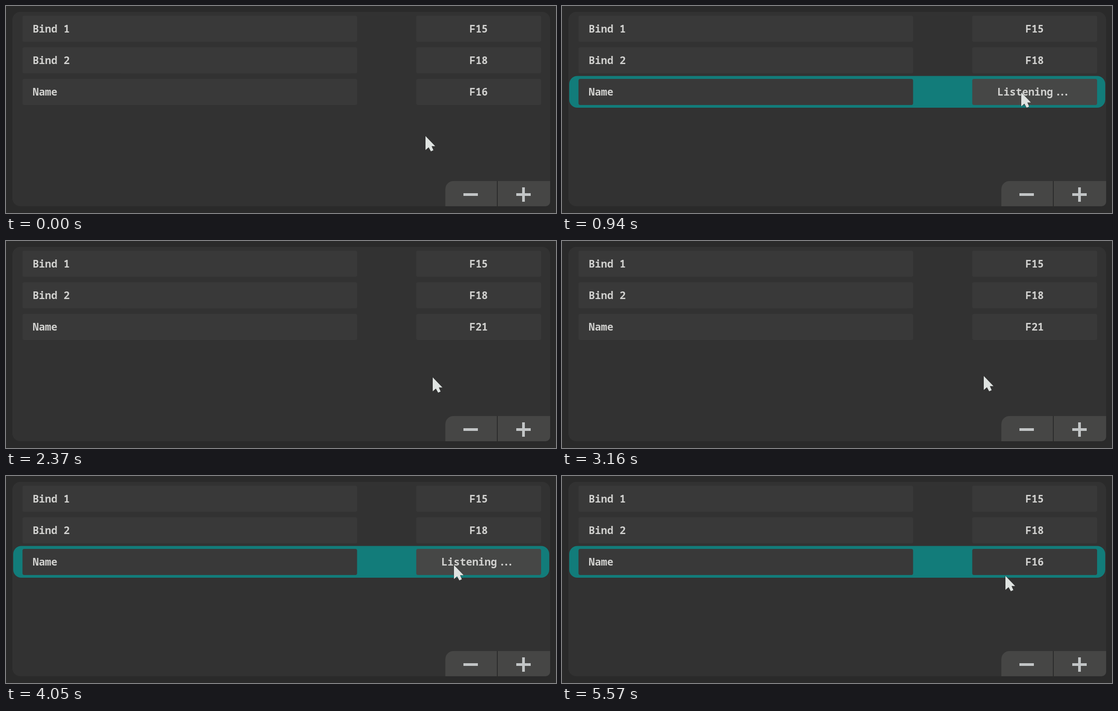
Recreate the animation shown at these times as an HTML page. Size 1218x460 px, loop 5600 ms.

```html
<!DOCTYPE html>
<html lang="en">
<head>
<meta charset="utf-8">
<title>Key binds</title>
<style>
  html, body { margin: 0; width: 100%; height: 100%; overflow: hidden; background: #2a2a2a; }
  svg { display: block; width: 1218px; height: 460px; }
  text { font: 600 22.8px "Noto Sans Mono", "DejaVu Sans Mono", monospace; fill: #d0d0ce; white-space: pre; }
  .key { text-anchor: middle; }
  .field { fill: #393939; }
</style>
</head>
<body>
<svg viewBox="0 0 1218 460">
  <rect x="14" y="13" width="1191" height="432" rx="18" fill="#323232"/>
  <rect id="glow" x="16" y="155.5" width="1187" height="70.5" rx="18" fill="#127c7a"/>
  <g id="rows"></g>
  <g id="listening">
    <text x="964" y="199">Listening</text>
    <text x="1092" y="199" letter-spacing="-4.7">...</text>
  </g>
  <path d="M973 445V407a18 18 0 0 1 18-18h96v56zM1089 389h116v46a10 10 0 0 1-10 10h-106z" fill="#464645"/>
  <path d="M1087 389h2v56h-2z" fill="#2b2b2b"/>
  <path d="M1013 419h32M1130 419h32M1146 403v32" stroke="#c2c5c6" stroke-width="6"/>
  <path id="cursor" d="M0 0V31L7 25L12 34L17.5 31.5L13.5 22.5H21.5Z" fill="#dfe3e1" stroke="#2a2a2a" paint-order="stroke"/>
</svg>
<script>
  const LOOP = 5600;
  const HOME = { x: 929, y: 289 };
  const $ = id => document.getElementById(id);

  $('rows').innerHTML = [['Bind 1', 'F15'], ['Bind 2', 'F18'], ['Name', 'F16']].map(([name, key], i) => {
    const y = 21.5 + i * 70.3;
    const base = 59 + i * 70;
    return `<rect class="field" x="36.5" y="${y}" width="741" height="58" rx="4"/>
      <rect class="field" id="box${i}" x="908.5" y="${y}" width="276.5" height="58" rx="4"/>
      <text x="59" y="${base}">${name}</text>
      <text class="key" id="key${i}" x="1046.5" y="${base}">${key}</text>`;
  }).join('');

  const moves = [
    { from: 0, to: 490, x: 1017, y: 192 },      // onto the key field
    { from: 1520, to: 2040, x: 1003, y: 185 },  // drift while the key is set
    { from: 2070, to: 2370, x: 945, y: 303 },   // leave the row
    { from: 2400, to: 3190, x: 934, y: 300 },
    { from: 3240, to: 3600, x: 992, y: 198 },   // return
    { from: 5560, to: 5570, x: 982, y: 222 }
  ];

  const easeOut = k => 1 - (1 - k) ** 2;

  function pointer(t) {
    let { x, y } = HOME;
    for (const m of moves) {
      const k = easeOut(Math.min(1, Math.max(0, (t - m.from) / (m.to - m.from))));
      x += (m.x - x) * k;
      y += (m.y - y) * k;
    }
    return { x, y };
  }

  const show = (el, on) => el.setAttribute('visibility', on ? 'visible' : 'hidden');

  function draw(t) {
    const step = t < 500 ? 70 : 10;
    const { x, y } = pointer(Math.floor(t / step) * step);
    const waiting = t >= 730 && t < 1520 || t >= 3740 && t < 4770;
    $('cursor').setAttribute('transform', `translate(${x} ${y})`);
    show($('glow'), y < 229);
    show($('listening'), waiting);
    show($('key2'), !waiting);
    $('key2').textContent = t >= 1520 && t < 4770 ? 'F21' : 'F16';
    $('box2').style.fill = y < 221 ? '#464746' : '#393939';
  }

  const start = performance.now();
  function tick() {
    draw((performance.now() - start) % LOOP);
    requestAnimationFrame(tick);
  }
  tick();
</script>
</body>
</html>
```
